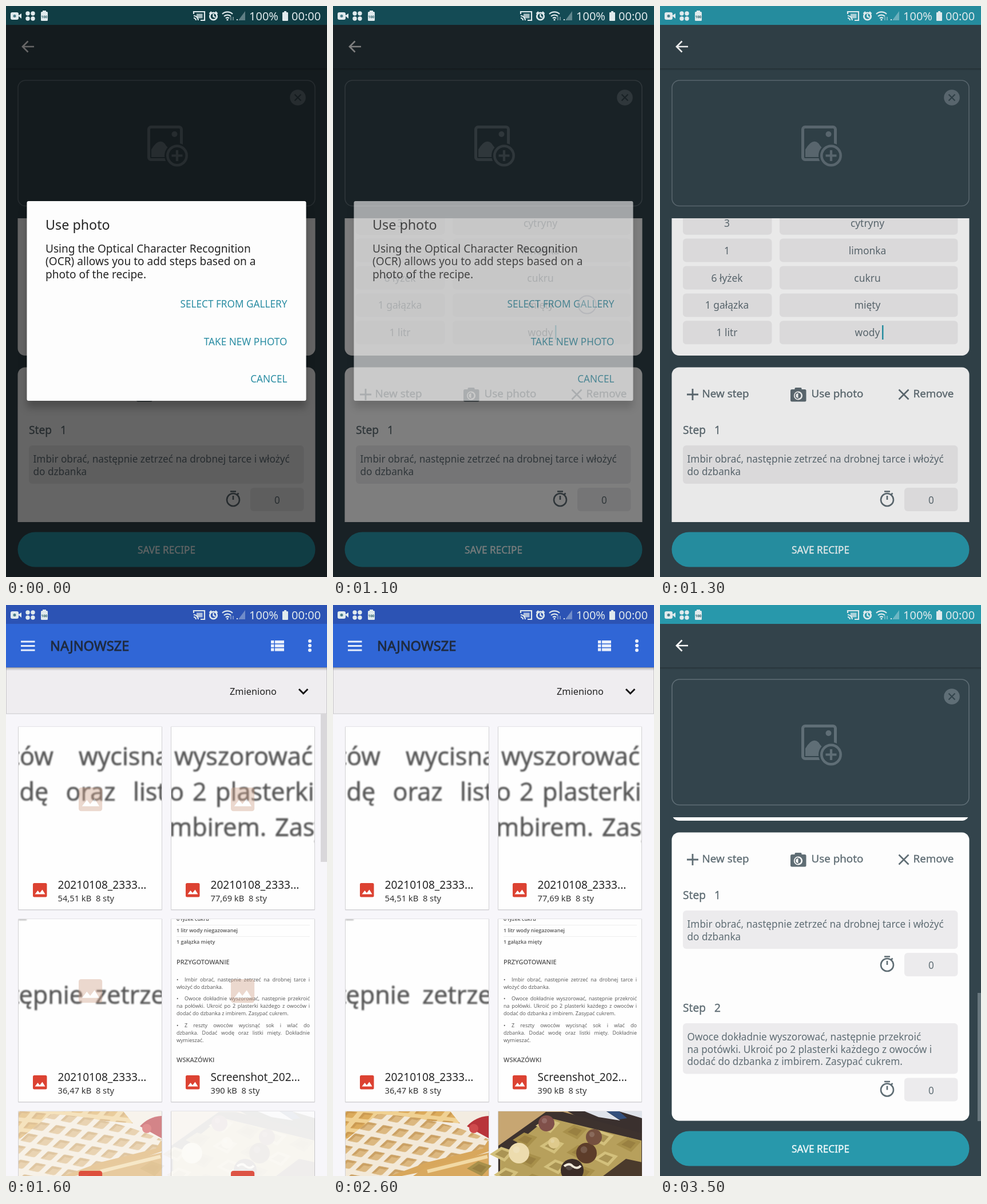
An HTML page that plays this animation: 561x998 px, repeating every 3600 ms.

```html
<!DOCTYPE html>
<html lang="en">
<head>
<meta charset="utf-8">
<title>Add steps from a photo</title>
<style>
  html, body { margin: 0; width: 100%; height: 100%; overflow: hidden; background: #33444c; }
  svg { display: block; width: 561px; height: 998px; }
  text { font-family: "Noto Sans", "Open Sans", sans-serif; white-space: pre; }
  .big, .page { font-family: "Open Sans", "Noto Sans", sans-serif; }
  .big { font-size: 43.2px; fill: #585858; stroke: #585858; stroke-width: .7px; }
  .page { font-size: 9px; line-height: 13px; color: #555; white-space: nowrap; }
  .page div { position: absolute; left: 9px; width: 233px; }
  .page .full { text-align-last: justify; }
  .page .dot { left: 23px; width: 219px; }
  .medium { stroke: currentColor; stroke-width: .35px; }
  .heavy { stroke: currentColor; stroke-width: .8px; }
  .line { fill: none; stroke: currentColor; }
</style>
</head>
<body>
<svg id="stage" viewBox="0 0 561 998"></svg>
<script>
const LOOP = 3600;
const stage = document.getElementById('stage');

const text = (x, y, size, color, str, anchor = 'start', cls = '') =>
  `<text x="${x}" y="${y}" font-size="${size}" fill="${color}" color="${color}" text-anchor="${anchor}" class="${cls}">${str}</text>`;
const rect = (x, y, w, h, fill, r = 0, more = '') =>
  `<rect x="${x}" y="${y}" width="${w}" height="${h}" rx="${r}" fill="${fill}" ${more}/>`;
const disc = (x, y, r, fill, more = '') => `<circle cx="${x}" cy="${y}" r="${r}" fill="${fill}" ${more}/>`;
const line = (d, color, w, more = '') =>
  `<path d="${d}" class="line" color="${color}" stroke-width="${w}" ${more}/>`;
const group = (id, inner, more = '') => `<g id="${id}" ${more}>${inner}</g>`;

// ---- status bar icons ----
function statusIcons() {
  const c = '#e0eaed';
  const dots = [[38, 13], [47, 13], [38, 22], [47, 22]].map(([x, y]) => disc(x, y, 3.7, c)).join('');
  return rect(8, 11, 14, 13, c, 3) + `<path d="M21 17l6-4v9z" fill="${c}"/>` + disc(15, 17.5, 2.5, '#4c7f8b') +
    dots + rect(61, 10, 12, 16, c, 1.5) + rect(64, 8, 6, 3, c) +
    text(67, 20.5, 6, '#33666f', '100', 'middle', 'medium') +
    line('M328 14V10H347V25H340M328 17a8 8 0 0 1 8 8M328 21a4 4 0 0 1 4 4', c, 2.2) +
    rect(333, 13.5, 10.5, 8, c, 0, 'opacity=".7"') +
    disc(362.5, 18, 6.2, 'none', `stroke="${c}" stroke-width="2.8"`) +
    line('M362.5 14V18.5L366 20M355.5 13.5L359 10M369.5 13.5L366 10', c, 2.4) +
    line('M378 14a13 13 0 0 1 18 0M381 18a9 9 0 0 1 12 0M384 21.5a4.5 4.5 0 0 1 6 0', c, 2.2) +
    disc(387, 24, 1.6, c) + line('M393 19v6M397 19v6', c, 1.4, 'opacity=".6"') +
    `<path d="M403 25h2v-2h-2z" fill="${c}"/><path d="M406 25L418 9V25z" fill="${c}" opacity=".38"/>` +
    text(425, 25, 20, c, '100%') + rect(483, 11, 10, 15, c, 1) + rect(486, 9, 4, 3, c) +
    text(499, 25, 20, c, '00:00');
}

// ---- recipe screen ----
const INK = '#5f6d74', FIELD = '#ecebed', CARD = '#fdfdfd';

function field(x, y, w, h) { return rect(x, y, w, h, FIELD, 6); }

function timer(y) {
  return disc(397, y, 11, 'none', `stroke="${INK}" stroke-width="2.6"`) +
    line(`M392 ${y - 14.5}h10M397 ${y - 7}v7M404 ${y - 9}l2.5-2.5`, INK, 2.6) +
    field(427, y - 21, 93.5, 41) + text(474, y + 7, 17.2, INK, '0', 'middle');
}

function step(n, y, lines) {
  const h = 24 + 21.5 * lines.length;
  return text(40, y, 19.2, INK, 'Step', 'start', 'medium') + text(95, y, 19.2, INK, n, 'start', 'medium') +
    field(40, y + 20, 480.5, h) +
    lines.map((s, i) => text(47.5, y + 50 + 21.5 * i, 17.2, INK, s)).join('') +
    timer(y + 20 + h + 28);
}

function ingredients() {
  const rows = [['3', 'cytryny'], ['1', 'limonka'], ['6 łyżek', 'cukru'], ['1 gałązka', 'mięty'], ['1 litr', 'wody']];
  return rect(20.5, 200, 520, 411, CARD, 13) + rows.map(([a, b], i) => {
    const y = 358.7 + 47.9 * i;
    return field(40, y, 155.5, 41) + field(209, y, 311.5, 41) +
      text(117, y + 27, 17.4, INK, a, 'middle') + text(362.5, y + 27, 17.4, INK, b, 'middle');
  }).join('') + rect(388, 558, 2.5, 25, '#2898ab');
}

function stepsCard() {
  return rect(20.5, 631.5, 520, 504, CARD, 13) +
    line('M47 679h20M57 669v20', INK, 2.8) + text(73.5, 684, 18.8, INK, 'New step', 'start', 'medium') +
    rect(228, 670, 27.5, 21.5, INK, 2.5) + rect(235.5, 667, 12, 5, INK, 1.5) +
    disc(241.5, 681, 7.6, CARD) + `<path d="M241.5 676a5 5 0 0 1 0 10z" fill="${INK}"/>` +
    line('M241.5 676a5 5 0 0 0 0 10', INK, 1.8) +
    text(264.5, 684, 18.8, INK, 'Use photo', 'start', 'medium') +
    line('M417.5 670.5l17 17M434.5 670.5l-17 17', INK, 2.6) + text(442.5, 684, 18.8, INK, 'Remove', 'start', 'medium') +
    step('1', 748, ['Imbir obrać, następnie zetrzeć na drobnej tarce i włożyć', 'do dzbanka']) +
    step('2', 945, ['Owoce dokładnie wyszorować, następnie przekroić',
      'na potówki. Ukroić po 2 plasterki każdego z owoców i', 'dodać do dzbanka z imbirem. Zasypać cukrem.']);
}

function recipe() {
  const bg = '#33444c', faint = '#5f6e76';
  return rect(0, 0, 561, 998, bg) + rect(0, 33, 561, 76, '#33434b') +
    rect(0, 109, 561, 4, 'url(#shade)') +
    line('M49 71H29M38.5 61.5L29 71l9.5 9.5', '#fff', 2.7) +
    rect(21, 130, 519, 219.5, 'none', 13, `stroke="${faint}" stroke-width="1.6"`) +
    disc(510, 160, 13.8, faint) + line('M504.5 154.5l11 11M515.5 154.5l-11 11', bg, 2.2) +
    rect(249.5, 211.5, 57, 57, 'none', 4, `stroke="${faint}" stroke-width="5"`) +
    `<path d="M254 264V251Q266 230 277 240Q283 250 289 251V264z" fill="${faint}"/>` +
    disc(294.5, 224, 5, faint) + disc(299, 261.5, 22, bg) +
    disc(299, 261.5, 16.7, 'none', `stroke="${faint}" stroke-width="4.5"`) +
    line('M289.5 261.5h19M299 252v19', faint, 4.2) +
    `<g clip-path="url(#view)">${group('scroll', ingredients() + stepsCard())}</g>` +
    group('recipeBar', rect(555, 678, 6, 224, '#68777e')) +
    rect(20.5, 919.5, 520, 61, '#2898ab', 30.5) +
    text(280.5, 957, 17.2, '#f4fafb', 'SAVE RECIPE', 'middle', 'medium');
}

function dialog() {
  const link = '#2a8da3', ink = '#242424';
  const body = ['Using the Optical Character Recognition', '(OCR) allows you to add steps based on a', 'photo of the recipe.'];
  const links = ['SELECT FROM GALLERY', 'TAKE NEW PHOTO', 'CANCEL'];
  return rect(36.5, 341, 488, 349, '#fdfdfd', 3, 'filter="url(#lift)"') +
    text(69, 391, 23.3, ink, 'Use photo') +
    body.map((s, i) => text(69, 430.5 + 22.8 * i, 19.1, ink, s)).join('') +
    links.map((s, i) => text(491.5, 527 + 65.5 * i, 17.2, link, s, 'end')).join('') +
    group('tap', disc(444, 522, 15.5, '#fff', 'fill-opacity=".72" stroke="#c3c7d4" stroke-width="2"'));
}

// ---- gallery ----
const picture = (x, y, k, fill) =>
  `<g transform="translate(${x} ${y}) scale(${k})">${rect(0, 0, 24.5, 24.5, fill, 2.5)}
   <path d="M3.5 19.5L8.5 13l3.5 4.2L16.5 11.5l5 8z" fill="#fff"/></g>`;

function tile(x, y, name, info) {
  return rect(x - 1, y - .5, 252, 321, '#000', 1, 'opacity=".15"') + rect(x, y, 250, 319, '#fefefe') +
    (name ? picture(x + 25, y + 273, 1, '#dc4232') + text(x + 68.5, y + 283, 19.1, '#262626', name) +
      text(x + 68.5, y + 304.5, 14.7, '#333', info) : '');
}

function page() {
  const rule = y => `<div style="top:${y}px;height:1px;background:#eee"></div>`;
  const row = (y, cls, s) => `<div class="${cls}" style="top:${y - 6.5}px">${s}</div>`;
  const bullet = y => row(y, '', '•');
  const strong = s => `<b style="font-weight:600">${s}</b>`;
  const head = s => `<span style="font-size:11px;font-weight:600">${s}</span>`;
  return `<foreignObject x="289" y="549" width="250" height="262">
    <div xmlns="http://www.w3.org/1999/xhtml" class="page" style="position:relative;width:250px;height:262px;overflow:hidden">` +
    row(-1, '', strong('6 łyżek cukru')) + rule(10) + row(19.5, '', strong('1 litr wody niegazowanej')) + rule(30) +
    row(39.5, '', strong('1 gałązka mięty')) + row(74, '', head('PRZYGOTOWANIE')) +
    bullet(105) + row(105, 'full dot', 'Imbir obrać, następnie zetrzeć na drobnej tarce i') +
    row(118, '', 'włożyć do dzbanka.') +
    bullet(138) + row(138, 'full dot', 'Owoce dokładnie wyszorować, następnie przekroić') +
    row(151.5, 'full', 'na połówki. Ukroić po 2 plasterki każdego z owoców i') +
    row(164.5, '', 'dodać do dzbanka z imbirem. Zasypać cukrem.') +
    bullet(185) + row(185, 'full dot', 'Z reszty owoców wycisnąć sok i wlać do') +
    row(198, 'full', 'dzbanka. Dodać wodę oraz listki mięty. Dokładnie') +
    row(211, '', 'wymieszać.') + row(245, '', head('WSKAZÓWKI')) + `</div></foreignObject>`;
}

function waffles() {
  return rect(22, 885, 250, 113, '#f3ece1') +
    '<path d="M22 885H205L222 906L150 900L22 950z" fill="url(#waffleBack)"/>' +
    '<path d="M234 911Q250 894 272 893V932z" fill="#b8343a"/>' + disc(246, 915, 8, '#cf4a4c') +
    '<path d="M22 945L78 893Q180 898 272 937V955L185 985L120 998H22z" fill="#d8a75c"/>' +
    '<path d="M22 935L78 890Q180 894 272 934L262 950L165 974L100 998H22z" fill="url(#waffle)"/>' +
    '<path d="M160 984L272 957V998H140z" fill="#d9a95f"/>' +
    '<path d="M165 990L270 964" stroke="#f2d9a4" stroke-width="6"/>';
}

function chocolates() {
  const wells = [0, 1, 2, 3].map(r => [0, 1, 2, 3].map(c => {
    const x = 375 + 47 * c - 40 * r, y = 908 + 11 * c + 25 * r;
    return `<path d="M${x - 21} ${y + 2}l20-13 23 8-17 18z" fill="${(r + c) % 2 ? '#a8904b' : '#d3c07c'}"/>
      <path d="M${x - 12} ${y + 2}l12-8 13 5-9 10z" fill="#8f773b" opacity=".6"/>`;
  }).join('')).join('');
  const sweets = [[373, 906, 14, '#80504a'], [325, 958, 18, '#eddcae'], [443, 958, 18, '#5d3d2a'],
    [456, 930, 14, '#75503f'], [418, 988, 20, '#3b2c27'], [386, 940, 10, '#dfca8c']];
  return rect(289, 885, 250, 113, '#c7a672') +
    '<path d="M410 885H540V930L440 902z" fill="#3a302e"/>' +
    '<path d="M440 885h38l24 16-38-6zM500 885h40v12z" fill="#dfe3ea"/>' +
    '<path d="M478 885h22l14 12-14 2z" fill="#34507c"/>' +
    '<path d="M289 945L372 886H402L540 923V998H289z" fill="#3d322e"/>' +
    '<path d="M292 964L376 896L539 936V998H292z" fill="#b7a05c"/>' + wells +
    '<path d="M472 998L512 968L540 974V998z" fill="#4a3a2c"/>' +
    sweets.map(([x, y, r, f]) => disc(x, y, r, f) + disc(x - r / 4, y - r / 3, r / 3, '#fff', 'opacity=".15"')).join('') +
    '<path d="M404 981q9-7 15 0 8 6 14-1" class="line" color="#f2e9d9" stroke-width="4"/>';
}

function gallery() {
  const A = 22, B = 289, pale = '#e9effb';
  const listIcon = [62, 68.7, 75.4].map(y => rect(463, y, 5.5, 5.2, pale) + rect(470, y, 16, 5.2, pale)).join('');
  const big = (x, y, s) => `<text x="${x}" y="${y}" class="big">${s}</text>`;
  const clip = (n, s) => `<g clip-path="url(#tile${n})"><g filter="url(#soft)">${s}</g></g>`;
  const names = '20210108_2333...';
  const base = tile(A, 213, names, '54,51 kB  8 sty') + tile(B, 213, names, '77,69 kB  8 sty') +
    tile(A, 549, names, '36,47 kB  8 sty') + tile(B, 549, 'Screenshot_202...', '390 kB  8 sty') +
    tile(A, 885) + tile(B, 885);
  const writing = clip(0, big(4, 279.5, 'c') + big(24, 279.5, 'ów') + big(127, 279.5, 'wycisnąć') +
      big(23.5, 341.5, 'dę') + big(104.5, 341.5, 'oraz') + big(222, 341.5, 'listki')) +
    clip(1, big(294, 279.5, 'wyszorować') + big(285, 341.5, 'o') + big(326, 341.5, '2') + big(366, 341.5, 'plasterki') +
      big(285, 403.5, 'mbirem.') + big(470, 403.5, 'Zasypać')) +
    clip(2, big(8, 696.5, 't') + big(22.5, 696.5, 'ępnie') + big(156, 696.5, 'zetrzeć') + rect(22, 549, 14, 2, '#aaa')) + page();
  const hold = [[127, 319], [393, 319], [127, 654], [393, 654]].map(([x, y]) => picture(x, y, 1.68, '#cfa188')).join('');
  const low = picture(127, 989, 1.68, '#dc4232') + picture(393, 989, 1.68, '#dc4232');
  return rect(0, 0, 561, 998, '#f7f6fa') + rect(0, 0, 561, 33, '#2c53b4') + rect(0, 33, 561, 76, '#3066d6') +
    line('M26 64H50.5M26 71.5H50.5M26 79H50.5', pale, 2.8) +
    text(77, 80, 23.6, '#1f2b40', 'NAJNOWSZE', 'start', 'heavy') + listIcon +
    [63, 71, 79].map(y => disc(531, y, 3, pale)).join('') +
    rect(.5, 109.5, 560, 80.5, '#efedf0', 0, 'stroke="#c9c8cb"') + rect(0, 109, 561, 6, 'url(#shade)') +
    text(391, 157, 16.3, '#222', 'Zmieniono') + line('M512 147l7.7 7.7 7.7-7.7', '#161616', 3) +
    group('tiles', base + group('writing', writing) + group('waffles', waffles()) +
      group('sweets', chocolates()) + group('hold', hold) + group('low', low)) +
    group('galleryBar', rect(550, 190, 11, 259, '#d9d7da'));
}

const tileClips = [[22, 213], [289, 213], [22, 549]]
  .map(([x, y], i) => `<clipPath id="tile${i}">${rect(x, y, 250, 262, '#000')}</clipPath>`).join('');
const grid = (id, face, pit, turn) => `<pattern id="${id}" width="28" height="28" patternUnits="userSpaceOnUse" patternTransform="${turn}">
  ${rect(0, 0, 28, 28, face)}${rect(6, 6, 18, 18, pit, 3)}<path d="M6 24V6H24L20 11H11V20z" fill="#b98a48" opacity=".5"/></pattern>`;

stage.innerHTML = `<defs>
  <linearGradient id="shade" x2="0" y2="1"><stop stop-color="#000" stop-opacity=".25"/><stop offset="1" stop-color="#000" stop-opacity="0"/></linearGradient>
  <clipPath id="view">${rect(0, 371, 561, 531, '#000')}</clipPath>${tileClips}
  <filter id="lift" x="-10%" y="-10%" width="120%" height="125%"><feDropShadow dx="0" dy="12" stdDeviation="7" flood-opacity=".25"/></filter>
  <filter id="soft"><feGaussianBlur stdDeviation=".8"/></filter>
  ${grid('waffle', '#f3e9d8', '#dcb880', 'translate(30 892) matrix(1 .2 -.75 .72 0 0)')}
  ${grid('waffleBack', '#f0d193', '#dcab5c', 'translate(22 880) matrix(1 .1 -.5 .6 0 0)')}
  </defs>` + recipe() + group('dim', rect(0, 33, 561, 965, '#000')) +
  rect(0, 0, 561, 33, '#2898ab') + group('barDim', rect(0, 0, 561, 33, '#000')) +
  group('dialog', dialog()) + group('gallery', gallery()) + statusIcons();

// ---- timeline: [ms, value], each value holds until the next ----
function track(id, prop, steps) {
  const frames = steps.map(([t, v]) => ({ offset: t / LOOP, [prop]: v, easing: 'step-end' }));
  frames.push({ offset: 1, [prop]: steps[steps.length - 1][1] });
  document.getElementById(id).animate(frames, { duration: LOOP, iterations: Infinity });
}
const fade = (id, ...steps) => track(id, 'opacity', steps);
const slide = (id, fn, share) =>
  track(id, 'transform', [[0, 0], ...share].map(([t, p]) => [t, `translateY(${fn(p)}px)`]));

const dimming = [[0, .6], [1100, .5], [1200, .31], [1300, .08], [1400, 0]];
fade('dim', ...dimming);
fade('barDim', ...dimming);
fade('dialog', [0, 1], [1100, .6], [1200, .07], [1300, 0]);
fade('tap', [0, 0], [900, 1], [1100, .5], [1200, 0]);
fade('gallery', [0, 0], [1400, 1], [3000, .5], [3100, 0]);
fade('tiles', [0, 0], [1500, 1]);
fade('writing', [0, 0], [1500, .4], [1600, 1]);
fade('waffles', [0, 0], [1500, .1], [1600, .6], [1700, .85], [1800, 1]);
fade('sweets', [0, 0], [1600, .08], [1700, .4], [1800, .75], [1900, 1]);
fade('hold', [0, .9], [1600, .4], [1700, .2], [1800, .08], [1900, 0]);
fade('low', [0, 1], [1600, .9], [1700, .5], [1800, .2], [1900, 0]);
fade('galleryBar', [0, 0], [1500, 1], [2200, .8], [2300, .6], [2400, .4], [2500, .2], [2600, 0]);
fade('recipeBar', [0, 0], [3200, 1]);
const glide = [[3200, .26], [3300, .68], [3400, .92], [3500, 1]];
slide('scroll', p => -234 * p, glide);
slide('recipeBar', p => 99 * (p - 1), glide);
</script>
</body>
</html>
```
